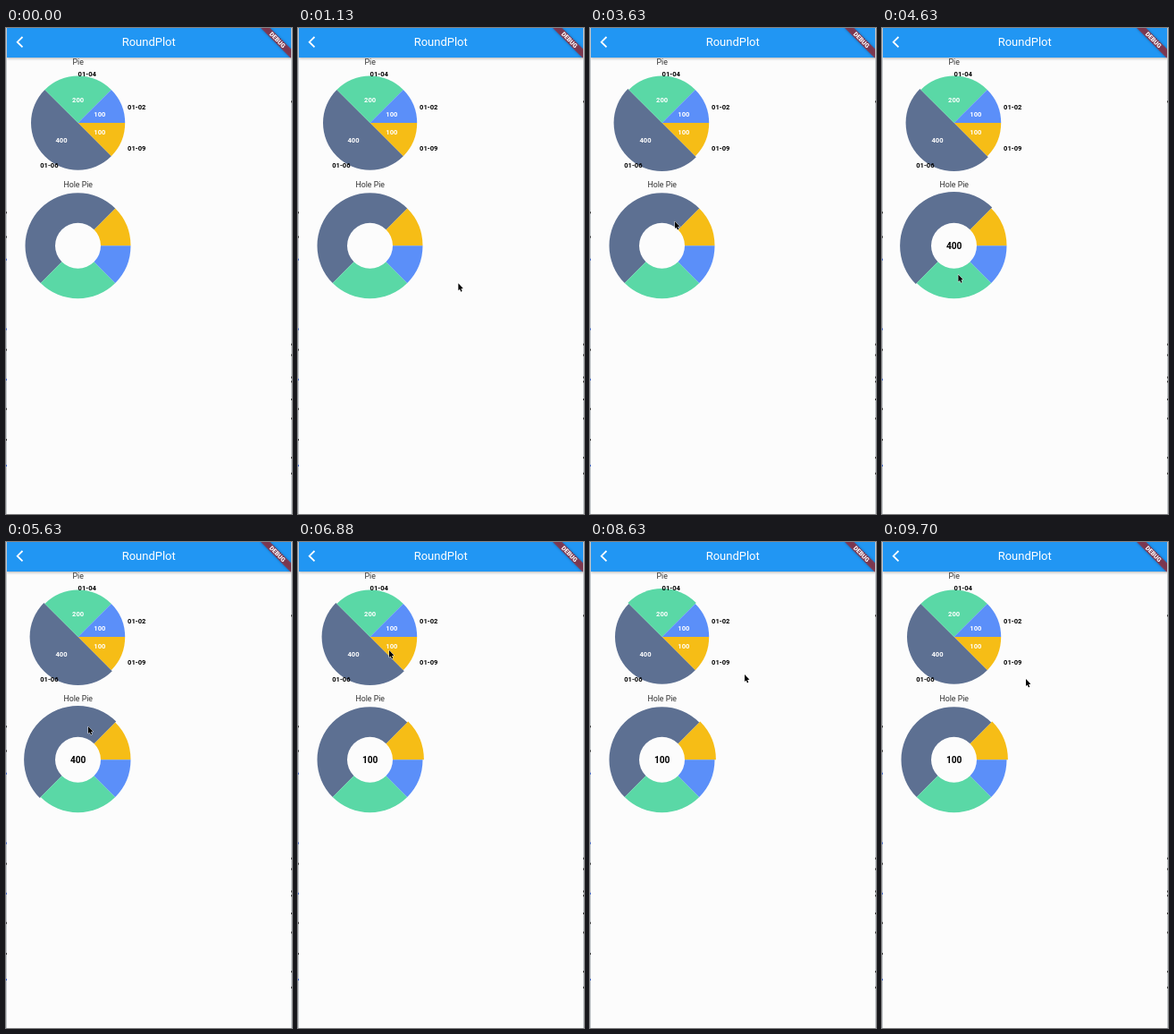
An HTML page with a canvas for the animation above (9900 ms loop, 320 by 543 pixels).

```html
<!DOCTYPE html>
<html lang="en">
<head>
<meta charset="utf-8">
<title>Pie charts</title>
<style>
html, body { margin: 0; width: 100%; height: 100%; overflow: hidden; background: #fcfcfc; }
canvas { display: block; }
</style>
</head>
<body>
<canvas id="stage" width="320" height="543"></canvas>
<script>
const ctx = document.getElementById('stage').getContext('2d');
const LOOP = 9900, STEP = 125, TURN = 2 * Math.PI, POP = 1.4;

const data = [
  { value: 100, color: '#f6bd16', label: '01-09' },
  { value: 400, color: '#5d7092', label: '01-06' },
  { value: 200, color: '#5ad8a6', label: '01-04' },
  { value: 100, color: '#5b8ff9', label: '01-02' }
];
const total = data.reduce((sum, d) => sum + d.value, 0);
let angle = 0;
for (const d of data) {
  d.from = angle;
  d.to = angle += d.value / total * TURN;
}

// dir: 1 runs clockwise, -1 counter-clockwise
const pie = { x: 80.6, y: 106.1, r: 52.6, hole: 0, dir: 1 };
const ring = { x: 80.5, y: 243.3, r: 59, hole: 25.5, dir: -1 };

// The pointer enters, then taps at each point: arrival time, x, y
const taps = [
  [625, 200, 330], [2125, 87, 85], [3000, 66, 132], [3625, 95, 216], [4875, 84, 284],
  [5500, 92, 206], [6000, 122, 222], [6875, 102, 121], [7750, 84, 78], [8625, 173, 148], [9375, 161, 153]
];

function sliceAt({ x, y, r, hole, dir }, px, py) {
  const dist = Math.hypot(px - x, py - y);
  const a = (Math.atan2(py - y, px - x) * dir + TURN) % TURN;
  return dist > hole && dist < r ? data.find(d => a < d.to) : undefined;
}

// The last tap on a chart's half of the page decides its selection
function selected(chart, t) {
  const last = taps.filter(([time, , y]) => time + STEP <= t && (y > 175) === (chart === ring)).pop();
  return last && sliceAt(chart, last[1], last[2]);
}

function pointerAt(t) {
  const next = taps.findIndex(tap => tap[0] > t);
  if (next === 0) return null;
  if (next < 0) return taps[taps.length - 1].slice(1);
  const [t0, x0, y0] = taps[next - 1], [t1, x1, y1] = taps[next];
  const k = Math.max(0, (t - t0 - STEP) / (t1 - t0 - STEP));
  const e = k * k * (3 - 2 * k);
  return [x0 + (x1 - x0) * e, y0 + (y1 - y0) * e];
}

function text(str, x, y, size, color = '#000', weight = 700, align = 'center') {
  ctx.font = `${weight} ${size}px Roboto, sans-serif`;
  ctx.textAlign = align;
  ctx.textBaseline = 'middle';
  ctx.fillStyle = color;
  ctx.fillText(str, x, y);
}

function polyline(...points) {
  ctx.beginPath();
  points.forEach(([x, y]) => ctx.lineTo(x, y));
}

function drawChart({ x, y, r, hole, dir }, picked) {
  for (const d of data) {
    const a = d.from * dir, b = d.to * dir;
    ctx.beginPath();
    ctx.arc(x, y, r + (d === picked ? POP : 0), a, b, dir < 0);
    ctx.arc(x, y, hole, b, a, dir > 0);
    ctx.fillStyle = d.color;
    ctx.fill();
  }
}

function drawLabels({ x, y, r }) {
  for (const d of data) {
    const mid = (d.from + d.to) / 2, cos = Math.cos(mid), sin = Math.sin(mid);
    text(d.value, x + cos * r / 2, y + sin * r / 2 + 0.6, 7.6, '#fff');
    text(d.label, x + cos * 60, y + sin * 60 + 5.3, 7.6, '#000', 700, 'left');
  }
}

function drawBanner() {
  ctx.save();
  ctx.translate(318.5, 0);
  ctx.rotate(Math.PI / 4);
  ctx.shadowColor = 'rgba(0,0,0,.5)';
  ctx.shadowBlur = 3;
  ctx.fillStyle = 'rgba(183,28,28,.63)';
  ctx.fillRect(-23.6, 16.3, 47.2, 7.4);
  ctx.shadowColor = 'transparent';
  text('DEBUG', -1, 20.2, 6.9, '#fff', 900);
  ctx.restore();
}

// Slivers of what lies behind the window
function drawEdges() {
  for (const x of [0, 319]) {
    ctx.fillStyle = '#c4c8cc';
    ctx.fillRect(x, 0, 1, 543);
    for (let i = 1; i <= 9; i++) {
      const random = Math.abs(Math.sin(i * 78.2 + x) * 437.5) % 1;
      ctx.fillStyle = x || i % 2 ? '#333' : '#3d62c4';
      ctx.fillRect(x, 70 + random * 430, 1, 2);
    }
  }
}

function drawPage() {
  ctx.fillStyle = '#fcfcfc';
  ctx.fillRect(0, 0, 320, 543);
  ctx.save();
  ctx.shadowColor = 'rgba(0,0,0,.3)';
  ctx.shadowBlur = 3;
  ctx.shadowOffsetY = 1;
  ctx.fillStyle = '#2196f3';
  ctx.fillRect(1, 0, 318, 33);
  ctx.restore();
  drawBanner();
  drawEdges();

  polyline([18.5, 10], [12.7, 15.7], [18.5, 21.4]);
  ctx.strokeStyle = '#fff';
  ctx.lineWidth = 1.8;
  ctx.stroke();
  text('RoundPlot', 159.7, 16, 13, '#fff', 400);
  text('Pie', 80.7, 38.7, 8.8, '#333', 400);
  text('Hole Pie', 80.7, 175.7, 8.8, '#333', 400);
}

function drawPointer([x, y]) {
  ctx.save();
  ctx.translate(x, y);
  ctx.scale(0.85, 0.9);
  polyline([0, 0], [0, 9], [2, 7.2], [3.5, 10.5], [5, 9.8], [3.6, 6.6], [6.4, 6.4]);
  ctx.closePath();
  ctx.strokeStyle = '#fff';
  ctx.lineWidth = 1;
  ctx.stroke();
  ctx.fillStyle = '#000';
  ctx.fill();
  ctx.restore();
}

function draw(now) {
  const t = Math.floor(now % LOOP / STEP) * STEP;
  drawPage();
  drawChart(pie, selected(pie, t));
  drawLabels(pie);

  const picked = selected(ring, t);
  drawChart(ring, picked);
  if (picked) text(picked.value, 80.7, 244, 10.2);

  const pointer = pointerAt(t);
  if (pointer) drawPointer(pointer);
  requestAnimationFrame(draw);
}
requestAnimationFrame(draw);
</script>
</body>
</html>
```
